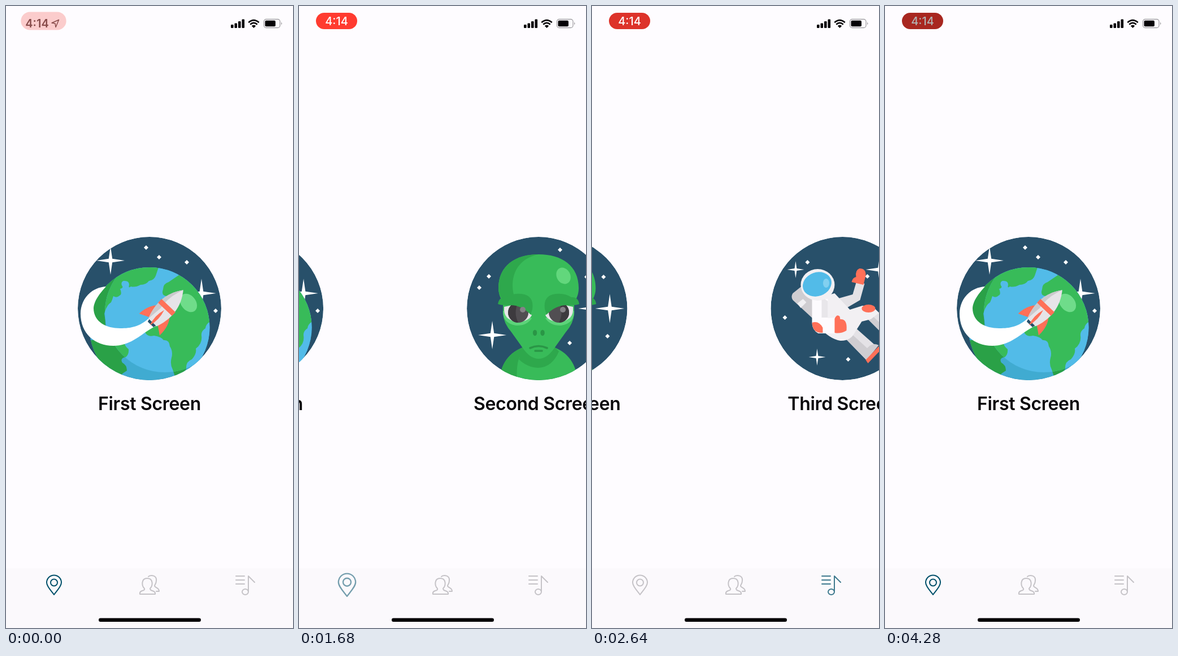
Recreate the animation shown at these times as an HTML page. Size 508 by 1102 pixels, loop 4.32 s.

```html
<!DOCTYPE html>
<html lang="en">
<head>
<meta charset="utf-8">
<title>Tab screens</title>
<style>
  html, body { margin: 0; width: 100%; height: 100%; overflow: hidden; background: #fefcff; }
  svg { display: block; width: 100%; height: 100%; }
  text { font-family: Inter, sans-serif; text-anchor: middle; }
  .title { font-size: 32px; font-weight: 600; letter-spacing: -.01em; fill: #08060a; }
  .clock { font-size: 20px; font-weight: 500; }
  .icon { fill: none; stroke-width: 2; stroke-linejoin: round; stroke-linecap: round; }
</style>
</head>
<body>
<svg viewBox="0 0 508 1102">
  <defs>
    <clipPath id="disc"><circle cx="254" cy="536" r="127"/></clipPath>
    <clipPath id="globe"><circle cx="254" cy="569.5" r="106.5"/></clipPath>
    <clipPath id="lit"><circle cx="281" cy="543" r="106"/></clipPath>
    <path id="star" fill="#fff" d="M0-25 3.2-3.2 25 0 3.2 3.2 0 25-3.2 3.2-25 0-3.2-3.2Z"/>
    <path id="spark" fill="#fff" d="M0-4 4 0 0 4-4 0Z"/>
    <g id="land">
      <path d="M271 460 265 478Q262 486 253 487 248 494 238 494 229 499 221 497 216 501 218 494 218 486 208 487 203 489 205 495 209 499 202 501 206 511 201 513 196 518 190 514 188 521 186 525 178 530 174 545 177 560 176 575L140 575V460Z"/>
      <path d="M140 592H208Q210 603 217 608 218 617 212 622 201 624 206 632 214 636 214 646 207 650 202 655L195 680H140Z"/>
      <path d="M310 474 288 489Q278 492 278 502 274 514 286 514L262 550Q247 568 246 578 251 587 262 584 275 586 279 592 289 591 290 603 296 612 293 623 290 635 295 644L299 656Q314 654 319 643 318 630 329 626 338 616 336 607 348 598 346 584 345 576 353 571 354 562 365 557V474Z"/>
    </g>
    <g id="eye">
      <path fill="#5dd37a" d="M191 540Q190 562 214 566 233 567 242 553Z"/>
      <path fill="#e8e6ea" d="M193 533Q191 557 216 559 235 560 242 548L222 527Z"/>
      <circle cx="218" cy="543" r="18" fill="#514e52"/>
      <path fill="#3d3a3e" d="M218 525A18 18 0 0 0 218 561Q209 543 218 525Z"/>
    </g>
    <path id="brow" fill="#2ea84c" d="M182 528Q184 515 196 516 210 507 229 511 246 516 243 537L240 547Q224 530 204 530 190 531 182 528Z"/>
  </defs>

  <g id="screens">
    <g>
      <g clip-path="url(#disc)">
        <circle cx="254" cy="536" r="127" fill="#28506a"/>
        <g class="sky" data-stars="185,451,1 346,509,1.03" data-sparks="248,428 271,445 320,454 371,540"></g>
        <g clip-path="url(#globe)">
          <rect x="127" y="409" width="254" height="254" fill="#40abd1"/>
          <use href="#land" fill="#2aa147"/>
          <g clip-path="url(#lit)">
            <rect x="127" y="409" width="254" height="254" fill="#52bbe8"/>
            <use href="#land" fill="#38bb59"/>
          </g>
          <ellipse rx="13" ry="18" transform="translate(323 526) rotate(-38)" fill="#6fdc8a"/>
        </g>
        <path fill="#fff" d="M177 497C148 499 132 522 132 545 132 580 157 602 190 602 224 602 240 579 267 566L252 554C236 568 222 571 202 571 178 571 155 560 155 535 156 522 166 509 177 497Z"/>
        <g transform="translate(258 562) rotate(43.5)">
          <path fill="#ff7058" d="M-14-31Q-27-18-28 3L-10-5ZM14-31Q26-18 25 6L10-5Z"/>
          <path fill="#28506a" d="M-9-5H9L7 3H-7Z"/>
          <path fill="#e6e4e8" d="M-10-2C-19-25-21-54 0-81 21-54 19-25 10-2Z"/>
          <path fill="#cbc9cd" d="M-10-2C-19-25-21-54 0-81Q-11-55-7-30Z"/>
          <path fill="#ff7058" d="M-17-43H17V-34H-17ZM0-32Q6-13 0 5-6-13 0-32Z"/>
        </g>
      </g>
      <text class="title" x="254" y="716">First Screen</text>
    </g>

    <g transform="translate(508)">
      <g clip-path="url(#disc)">
        <circle cx="254" cy="536" r="127" fill="#28506a"/>
        <g class="sky" data-stars="172,583,1 350,536,1.03" data-sparks="292,432 166,479 149,499 309,597 339,480 346,585"></g>
        <path fill="#38bb59" d="M184 670C185 630 207 610 232 603H276C301 610 322 630 324 670Z"/>
        <path fill="#2ea84c" d="M184 670C185 630 207 610 232 603L219 625Q214 640 216 670ZM219 626 232 600H278L290 612Q278 640 254 641 235 641 219 626Z"/>
        <path fill="#38bb59" d="M183 500C183 460 213 440 254 440S325 460 325 500Q325 514 317 524V545Q316 562 302 578L282 606Q269 625 254 625T226 606L206 578Q192 562 191 545V524Q183 514 183 500Z"/>
        <path fill="#2ea84c" d="M183 500C183 460 213 440 254 440 224 446 208 467 208 496Q208 508 213 520H190Q183 512 183 500Z"/>
        <ellipse rx="12" ry="15" transform="translate(298 478) rotate(-28)" fill="#62d77c"/>
        <use href="#eye"/><use href="#eye" transform="matrix(-1 0 0 1 508 0)"/>
        <use href="#brow"/><use href="#brow" transform="matrix(-1 0 0 1 508 0)"/>
        <g fill="#858287"><circle cx="226" cy="538" r="5"/><circle cx="297" cy="538" r="5"/></g>
        <g fill="#2a9646"><ellipse cx="247.5" cy="579" rx="3.7" ry="5.2"/><ellipse cx="261" cy="579" rx="3.7" ry="5.2"/></g>
        <path fill="none" stroke="#2a9646" stroke-width="3.6" stroke-linecap="round" d="M239 606Q254 599 269 606M248 611H260"/>
      </g>
      <text class="title" x="254" y="716">Second Screen</text>
    </g>

    <g transform="translate(1016)">
      <g clip-path="url(#disc)">
        <circle cx="254" cy="536" r="127" fill="#28506a"/>
        <g class="sky" data-stars="171,467,.6 209,622,.6 320,467,1" data-sparks="192,454 152,552 264,626 298,479 350,545"></g>
        <path fill="#cfcdd1" d="M186 493 166 509Q162 515 166 521L206 558 230 520Z"/>
        <path fill="#f0eff2" d="M174 527 184 519 190 525 180 535Z"/>
        <path fill="#e4e2e6" d="M240 520 272 511 279 487 293 492 285 521 256 538Z"/>
        <path fill="#ff7058" d="M270 489Q272 481 278 480 276 468 284 465 296 465 295 478L291 494Z"/>
        <path fill="#e4e2e6" d="M260 590 279 572 314 603 296 627Z"/>
        <path fill="#cfcdd1" d="M260 590 270 581 304 612 296 627ZM294 611Q305 594 318 601L297 627Z"/>
        <path fill="#ff7058" d="M295 627 318 603 322 609 299 633Z"/>
        <path fill="#e4e2e6" d="M296 552 311 536 342 566 326 582Z"/>
        <path fill="#cfcdd1" d="M296 552 304 546 334 575 326 582Z"/>
        <path fill="#ff7058" d="M325 583 343 565 347 570 329 588Z"/>
        <path fill="#f2f0f3" d="M202 519 240 509 267 538 289 531Q308 530 318 544L304 555 288 559 276 578Q268 594 250 593 231 590 212 568Z"/>
        <ellipse cx="300" cy="536" rx="12" ry="7" fill="#ff7058"/>
        <path fill="#fdfbfe" d="M200 519H228V553L241 552V580H211Q200 574 200 561Z"/>
        <path fill="#e8e6ea" d="M217 515 228 523V552H217Z"/>
        <path fill="#ff7058" d="M200 561Q212 557 219 570V579Q201 580 200 561ZM240 554Q244 545 249 550L250 555Q263 554 261 575 251 581 240 579Z"/>
        <ellipse cx="210" cy="494" rx="30" ry="28" fill="#f2f0f3"/>
        <ellipse rx="26" ry="21" transform="translate(209 493) rotate(-20)" fill="#52bbe8"/>
        <ellipse cx="225" cy="491" rx="5.5" ry="8" fill="#82d0f0"/>
      </g>
      <text class="title" x="254" y="716">Third Screen</text>
    </g>
  </g>

  <rect y="996" width="508" height="106" fill="#fbf9fc"/>
  <g id="tabs">
    <g class="icon">
      <path d="M85 1043C79 1035 72 1028 72 1021.500A13 13 0 0 1 98 1021.500C98 1028 91 1035 85 1043Z"/>
      <circle cx="85" cy="1021.500" r="6"/>
    </g>
    <g class="icon">
      <path d="M245 1032C240 1027 239 1014 250 1014S260 1027 255 1032Q255 1035 259 1036 265 1038 264 1042H237Q236 1038 241 1036 246 1035 245 1032Z"/>
      <path d="M252 1011C257 1007 267 1009 266 1018 266 1023 264 1024 263 1027 263 1031 271 1030 271 1037H266"/>
    </g>
    <g class="icon">
      <path d="M407 1010H422M407 1017H422M407 1024H422M429 1037V1010L440 1021"/>
      <ellipse cx="423.500" cy="1038" rx="5.500" ry="5"/>
    </g>
  </g>
  <rect x="164" y="1084.500" width="181" height="6.500" rx="3.250" fill="#050306"/>

  <g id="idleClock" fill="#2a1012">
    <text class="clock" x="55" y="38" style="font-weight:600">4:14</text>
    <path fill="none" stroke="#2a1012" stroke-width="1.500" stroke-linejoin="round" d="M93.500 24.500 88 37.500 87 31 81 30Z"/>
  </g>
  <g id="recording">
    <rect id="pill" x="30" y="12" width="73" height="29" rx="14.500"/>
    <text id="pillTime" class="clock" x="66.500" y="33.500">4:14</text>
  </g>

  <g fill="#050306">
    <rect x="398" y="33" width="4.600" height="6" rx="1.200"/>
    <rect x="404.500" y="30.500" width="4.600" height="8.500" rx="1.200"/>
    <rect x="411" y="27" width="4.600" height="12" rx="1.200"/>
    <rect x="417.500" y="23.500" width="4.600" height="15.500" rx="1.200"/>
    <path d="M438.500 39 434.800 35.300Q438.500 32.400 442.200 35.300Z"/>
    <path fill="none" stroke="#050306" stroke-width="2.700" d="M429.300 29.300Q438.500 21 447.700 29.300M432.300 32.700Q438.500 27 444.700 32.700"/>
    <rect x="456.500" y="23.500" width="28.500" height="15" rx="4" fill="none" stroke="#a19fa3" stroke-width="1.300"/>
    <rect x="458.500" y="25.700" width="18.500" height="10.600" rx="2"/>
    <path fill="#a19fa3" d="M487 28.500Q490 31 487 33.500Z"/>
  </g>
</svg>

<script>
  const LOOP = 4320, PAGE = 508, SLIDE = 250, PRESS = 150;
  const ACTIVE = '#00506a', INACTIVE = '#c5c3c7';
  const TAPS = [
    { tab: 1, release: 770, slide: 797 },
    { tab: 0, release: 1567, slide: 1584 },
    { tab: 2, release: 2490, slide: 2460 },
    { tab: 0, release: 3148, slide: 3168 }
  ];
  const byId = id => document.getElementById(id);
  const tabs = [...byId('tabs').children];
  const clamp = v => Math.min(1, Math.max(0, v));
  const smooth = p => p * p * (3 - 2 * p);
  const quadInOut = p => p < .5 ? 2 * p * p : 1 - 2 * (1 - p) ** 2;
  const scaleRgb = (rgb, k) => `rgb(${rgb.map(c => Math.round(c * k))})`;

  for (const sky of document.querySelectorAll('.sky')) {
    const place = (list, shape) => list.split(' ').map(item => {
      const [x, y, size = 1] = item.split(',');
      return `<use href="#${shape}" transform="translate(${x} ${y}) scale(${size})"/>`;
    }).join('');
    sky.innerHTML = place(sky.dataset.stars, 'star') + place(sky.dataset.sparks, 'spark');
  }

  function drawScreens(t) {
    let x = 0;
    for (const { tab, slide } of TAPS) x += (tab * PAGE - x) * smooth(clamp((t - slide) / SLIDE));
    byId('screens').setAttribute('transform', `translate(${-x})`);
  }

  function drawTabs(t) {
    let active = 0;
    const opacity = [1, 1, 1], scale = [1, 1, 1];
    for (const { tab, release } of TAPS) {
      const since = t - release;
      if (since >= 0) active = tab;
      if (since < -PRESS - 50 || since > 250) continue;
      opacity[tab] = since < 0
        ? 1 - .8 * quadInOut(clamp((since + PRESS + 50) / PRESS))
        : .2 + .8 * quadInOut(since / 250);
      scale[tab] = 1 + .36 * Math.sin(Math.PI * clamp((since - 15) / 130)) ** 2;
    }
    tabs.forEach((icon, i) => {
      const cx = 85 + 169 * i, cy = 1026;
      icon.setAttribute('stroke', i === active ? ACTIVE : INACTIVE);
      icon.setAttribute('opacity', opacity[i]);
      icon.setAttribute('transform', `translate(${cx} ${cy}) scale(${scale[i]}) translate(${-cx} ${-cy})`);
    });
  }

  function drawClock(t) {
    const enter = smooth(clamp(t / 280));
    const glow = .93 + .07 * Math.cos((t - 1720) / 2100 * 2 * Math.PI);
    const dim = 1 - .3 * clamp((t - 4160) / 120);
    const grow = 1.1 - .1 * enter;
    byId('idleClock').setAttribute('opacity', .72 * (1 - enter));
    byId('recording').setAttribute('opacity', .24 + .76 * enter);
    byId('recording').setAttribute('transform', `translate(66.5 26.5) scale(${grow}) translate(-66.5 -26.5)`);
    byId('pill').setAttribute('fill', scaleRgb([255, 59, 48], glow * dim));
    byId('pillTime').setAttribute('fill', scaleRgb([255, 255, 255], dim));
    byId('pillTime').setAttribute('opacity', enter);
  }

  function frame() {
    const t = performance.now() % LOOP;
    drawScreens(t);
    drawTabs(t);
    drawClock(t);
    requestAnimationFrame(frame);
  }
  frame();
</script>
</body>
</html>
```
